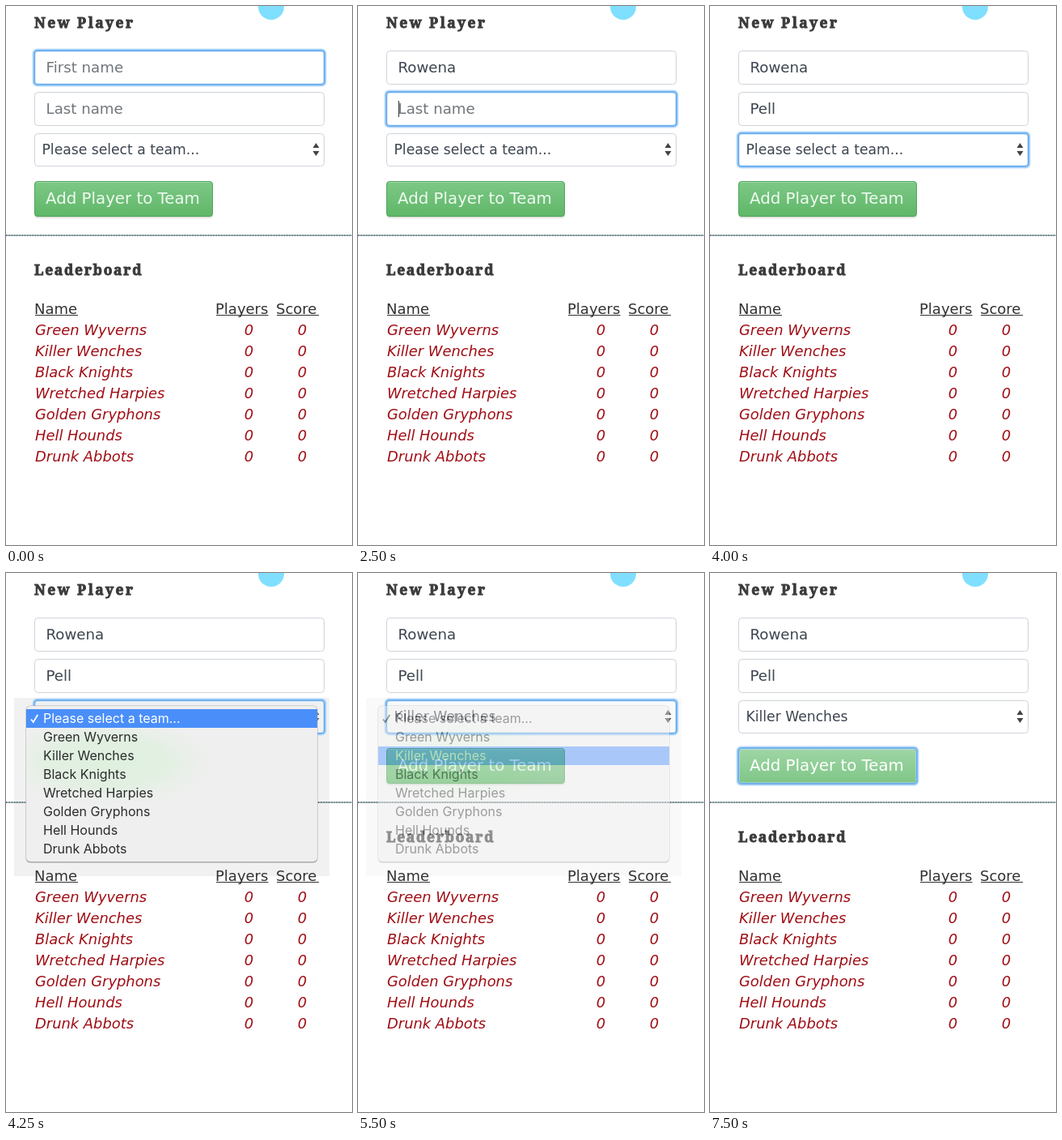
Recreate the animation shown at these times as an HTML page. Size 428 px wide and 665 px high, loop 8 s.

```html
<!DOCTYPE html>
<html lang="en">
<head>
<meta charset="utf-8">
<title>New Player form</title>
<style>
  html, body { margin: 0; width: 100%; height: 100%; overflow: hidden; background: #fff; }
  svg { display: block; width: 428px; height: 665px; }
  text { font: 18.2px "DejaVu Sans", sans-serif; fill: #3d4550; white-space: pre; }
  .title { font: bold 17.5px "Noto Serif", serif; fill: #3a3a3a; stroke: #3a3a3a; stroke-width: .9; }
  .field { fill: none; stroke: #ced4da; }
  .ring { fill: none; visibility: hidden; }
  .ring .glow { stroke: #b9daf9; stroke-width: 4; }
  .ring .edge { stroke: #70b1ef; stroke-width: 2; }
  .on { visibility: visible; }
  .hint { fill: #70767c; }
  #choice { font-size: 17.2px; }
  #label { font-size: 19.8px; fill: #effaf0; }
  .head { font-size: 18px; fill: #333; }
  .team { font-size: 17.9px; font-style: italic; fill: #a00d14; }
  .num { text-anchor: middle; }
  #menu text { font: 16px Inter, sans-serif; fill: #2b2b2b; }
  #menu text.lit { fill: #fff; }
  #tick { fill: none; stroke: #2b2b2b; stroke-width: 1.8; }
  #tick.lit { stroke: #fff; }
</style>
</head>
<body>
<svg viewBox="0 0 428 665">
  <defs>
    <linearGradient id="green" x2="0" y2="1">
      <stop stop-color="#7dc886"/><stop offset="1" stop-color="#5fb768"/>
    </linearGradient>
    <linearGradient id="pale" x2="0" y2="1">
      <stop stop-color="#9fd6a5"/><stop offset="1" stop-color="#7fc687"/>
    </linearGradient>
    <radialGradient id="tint">
      <stop stop-color="#dff0df"/><stop offset=".5" stop-color="#e2f0e2"/>
      <stop offset="1" stop-color="#efefef" stop-opacity="0"/>
    </radialGradient>
    <clipPath id="panel"><rect x="25" y="164" width="360" height="192" rx="5"/></clipPath>
  </defs>

  <rect id="shade" x="10" y="154" width="390" height="220" fill="#f1f1f1"/>
  <rect id="ghost" x="11.5" y="154.5" width="387" height="219" fill="none" stroke="#f5f5f5"/>

  <circle cx="328" cy="1" r="16" fill="#80dfff"/>
  <text class="title" x="35" y="27" letter-spacing="2.45">New Player</text>
  <text class="title" x="35" y="332" letter-spacing="1.7">Leaderboard</text>

  <g id="fields"></g>
  <text id="first" x="49.5" y="82"></text>
  <text id="last" x="49.5" y="133"></text>
  <text id="choice" x="44.5" y="183"></text>
  <path d="M379.5 175L383.5 169L387.5 175ZM379.5 179L383.5 185L387.5 179Z" fill="#444"/>
  <rect id="caret" width="1" height="20" fill="#333"/>

  <rect x="35" y="218" width="221" height="44" rx="4" fill="#000" opacity=".1"/>
  <rect id="button" x="35.5" y="216.5" width="220" height="43" rx="3.5" stroke="#4ba556"/>
  <path d="M38 217.5H253" stroke="#fff" stroke-opacity=".3"/>
  <g id="press"></g>
  <text id="label" x="49" y="244">Add Player to Team</text>

  <path d="M0 283H428" stroke="#23474f" stroke-width="2" stroke-dasharray="1 1"/>
  <g id="board"></g>

  <g id="menu">
    <rect x="24.5" y="163.5" width="361" height="194" rx="5.5" fill="#a9a9a9"/>
    <rect x="25" y="164" width="360" height="192" rx="5" fill="#efefef"/>
    <ellipse cx="125" cy="233" rx="150" ry="62" fill="url(#tint)" clip-path="url(#panel)"/>
    <rect id="bar" x="25" width="360" height="23" fill="#4a8ff9"/>
    <path id="tick" d="M31 180.5L33.8 184L39.2 175"/>
  </g>
</svg>
<script>
const LOOP = 8000;
const PROMPT = "Please select a team...";
const TEAMS = ["Green Wyverns", "Killer Wenches", "Black Knights", "Wretched Harpies",
  "Golden Gryphons", "Hell Hounds", "Drunk Abbots"];
const FIRST = "Rowena", LAST = "Pell";

const $ = id => document.getElementById(id);
const show = (el, on) => { el.style.display = on ? "" : "none"; };

function add(parent, tag, attrs, text = "") {
  const el = document.createElementNS("http://www.w3.org/2000/svg", tag);
  for (const key in attrs) el.setAttribute(key, attrs[key]);
  el.textContent = text;
  parent.append(el);
  return el;
}

// A rounded outline whose path lies `out` pixels outside the given box.
const outline = (parent, cls, y, width, height, out) => add(parent, "rect", {
  class: cls, x: 35 - out, y: y - out, width: width + 2 * out, height: height + 2 * out, rx: 4
});

function addRing(parent, y, width, height) {
  const ring = add(parent, "g", { class: "ring" });
  outline(ring, "glow", y, width, height, .5);
  outline(ring, "edge", y, width, height, 0);
  return ring;
}

const rings = [[55, 42], [106, 42], [157, 41]].map(([y, h]) => {
  outline($("fields"), "field", y, 359, h, -.5);
  return addRing($("fields"), y, 359, h);
});
rings.push(addRing($("press"), 216, 221, 44));

[["Name", 36, 89], ["Players", 260, 324.5], ["Score", 335, 387]].forEach(([word, x, end]) => {
  add($("board"), "text", { x: x - 1, y: 380, class: "head" }, word);
  add($("board"), "path", { d: `M${x} 381.5H${end}`, stroke: "#333" });
});
TEAMS.forEach((team, i) => {
  const y = 406 + 26 * i;
  add($("board"), "text", { x: 36, y, class: "team" }, team);
  for (const x of [300.5, 366.5]) add($("board"), "text", { x, y, class: "team num" }, "0");
});
const items = [PROMPT, ...TEAMS].map((name, i) =>
  add($("menu"), "text", { x: 46, y: 185 + 23 * i }, name));

// Each step is [start time, value]; the latest one reached applies.
const at = (steps, t) => steps.reduce((value, [start, next]) => t >= start ? next : value, steps[0][1]);

const FOCUS = [[0, 0], [2500, 1], [4000, 2], [7500, 3]];
const FIRST_LEN = [[0, 0], [1000, 1], [1250, 2], [1500, 4], [1750, 5], [2250, 6]];
const LAST_LEN = [[0, 0], [3000, 1], [3250, 3], [3500, 4]];
const MENU = [[0, 0], [4250, 1], [5500, .45], [5750, 0]];
const ROW = [[0, 0], [4500, 1], [5000, 2], [5250, -1], [5500, 2]];

function fill(el, name, count, hint) {
  el.textContent = count ? name.slice(0, count) : hint;
  el.setAttribute("class", count ? "" : "hint");
  return count ? el.getComputedTextLength() : 0;
}

function draw(t) {
  const focus = at(FOCUS, t);
  const widths = [
    fill($("first"), FIRST, at(FIRST_LEN, t), "First name"),
    fill($("last"), LAST, at(LAST_LEN, t), "Last name")
  ];
  rings.forEach((ring, i) => ring.classList.toggle("on", i === focus));

  show($("caret"), t >= 500 && focus < 2);
  if (focus < 2) {
    $("caret").setAttribute("x", Math.round(50 + widths[focus]));
    $("caret").setAttribute("y", 66 + 51 * focus);
  }

  $("choice").textContent = t < 5500 ? PROMPT : TEAMS[1];
  $("button").setAttribute("fill", focus === 3 ? "url(#pale)" : "url(#green)");
  $("label").style.fill = focus === 3 ? "#fff" : "";

  const open = at(MENU, t), row = at(ROW, t);
  show($("menu"), open);
  show($("shade"), open);
  $("menu").style.opacity = $("shade").style.opacity = open;
  show($("ghost"), t >= 5750 && t < 7500);
  show($("bar"), row >= 0);
  $("bar").setAttribute("y", 168 + 23 * Math.max(row, 0));
  items.forEach((item, i) => item.classList.toggle("lit", i === row));
  $("tick").classList.toggle("lit", row === 0);
}

const begin = performance.now();
function frame() {
  draw((performance.now() - begin) % LOOP);
  requestAnimationFrame(frame);
}
frame();
</script>
</body>
</html>
```
